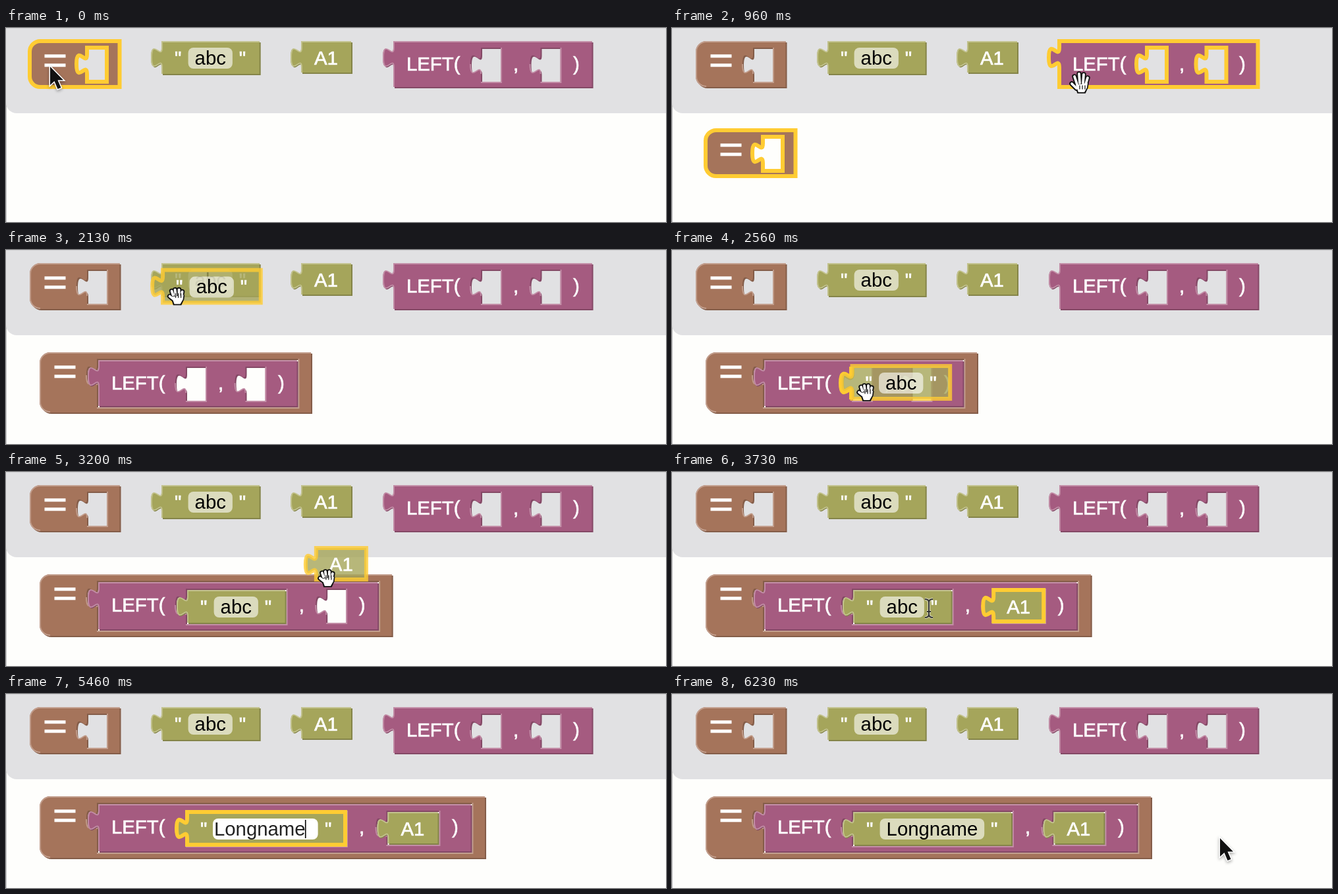
Recreate the animation shown at these times as an HTML page with a canvas. Size 1002 by 296 pixels, loop 7500 ms.

```html
<!DOCTYPE html>
<html lang="en">
<head>
<meta charset="utf-8">
<title>Formula blocks</title>
<style>
html, body { margin: 0; width: 100%; height: 100%; overflow: hidden; background: #fefefc; }
canvas { display: block; }
</style>
</head>
<body>
<canvas id="stage" width="1002" height="296"></canvas>
<script>
const ctx = document.getElementById('stage').getContext('2d');
const LOOP = 7500;
const FONT = '29.33px "Liberation Sans", Arial, Helvetica, sans-serif';
const YELLOW = '#ffcc33';
const BROWN = { fill: '#a5745b', light: '#c39f8e', dark: '#845d49' };
const OLIVE = { fill: '#a5a55b', light: '#c3c38e', dark: '#848449' };
const PLUM = { fill: '#a55b80', light: '#c38ea7', dark: '#844966' };

ctx.font = FONT;
const textWidth = s => ctx.measureText(s).width;

// Block models: size, holes and labels

function textBlock(value, typed) {
  const field = textWidth(value) + 20;
  return { color: OLIVE, w: field + 81.4, h: 50, holes: [], field, value, typed };
}

function cellBlock() {
  return { color: OLIVE, w: 76, h: 48, holes: [], labels: [['A1', 20, 35.5]] };
}

function makeHole(x, child) {
  return { x, y: 10, w: child ? child.w + 4 : 30, h: child ? child.h + 4 : 52, child };
}

function leftBlock(a, b) {
  const first = makeHole(133, a);
  const second = makeHole(133 + first.w + 60.5, b);
  const end = second.x + second.w;
  return {
    color: PLUM, w: end + 48, h: Math.max(first.h, second.h) + 18, holes: [first, second],
    labels: [['LEFT(', 20, 45], [',', 133 + first.w + 19, 45], [')', end + 19.5, 45]]
  };
}

function equalsBlock(child) {
  const slot = makeHole(87, child);
  return { color: BROWN, w: 87 + slot.w + 19.5, h: slot.h + 18, holes: [slot], round: true };
}

// Drawing

function tab(x, y) {
  ctx.lineTo(x, y + 10);
  ctx.bezierCurveTo(x, y + 30, x - 16, y - 6, x - 16, y + 25);
  ctx.bezierCurveTo(x - 16, y + 56, x, y + 20, x, y + 40);
}

function piece(x, y, w, h) {
  ctx.moveTo(x, y);
  tab(x, y);
  ctx.lineTo(x, y + h);
  ctx.lineTo(x + w, y + h);
  ctx.lineTo(x + w, y);
  ctx.closePath();
}

function outline(b) {
  ctx.beginPath();
  if (b.round) ctx.roundRect(0, 0, b.w, b.h, [16, 0, 0, 16]);
  else piece(0, 0, b.w, b.h);
  for (const s of b.holes) piece(s.x, s.y, s.w, s.h);
}

function bevel(b) {
  ctx.strokeStyle = b.color.light;
  ctx.lineWidth = 1.8;
  ctx.beginPath();
  ctx.moveTo(b.w, 1);
  if (b.round) {
    ctx.lineTo(16, 1);
    ctx.arcTo(1, 1, 1, 16, 15);
    ctx.lineTo(1, b.h - 16);
    ctx.arcTo(1, b.h - 1, 6, b.h - 1, 15);
  } else {
    ctx.lineTo(1, 1);
    tab(1, 0);
    ctx.lineTo(1, b.h);
  }
  for (const s of b.holes) {
    const r = s.x + s.w + 1, d = s.y + s.h + 1;
    ctx.moveTo(r, s.y);
    ctx.lineTo(r, d);
    ctx.lineTo(s.x, d);
    ctx.moveTo(s.x - 16, s.y + 25);
    ctx.bezierCurveTo(s.x - 16, s.y + 56, s.x, s.y + 20, s.x, s.y + 40);
  }
  ctx.stroke();
}

function label(s, x, y) {
  ctx.fillStyle = ctx.strokeStyle = '#fff';
  ctx.lineWidth = 0.7;
  ctx.fillText(s, x, y);
  ctx.strokeText(s, x, y);
}

function box(x, y, w, h, r, color) {
  ctx.fillStyle = color;
  ctx.beginPath();
  ctx.roundRect(x, y, w, h, r);
  ctx.fill();
}

function drawField(b) {
  label('"', 20, 35.5);
  label('"', 50.4 + b.field, 35.5);
  if (!b.typed) {
    box(40.6, 10, b.field, 32, 8, 'rgba(255,255,255,.6)');
    ctx.fillStyle = '#000';
    ctx.fillText(b.value, 50.6, 35.5);
    return;
  }
  const { text, caret, all } = b.typed;
  const w = textWidth(text);
  box(39, 10, b.field + 1, 32, 8, '#fff');
  if (all) box(41, 11, w, 30, 0, '#b4d5fe');
  ctx.fillStyle = '#222';
  ctx.fillText(text, 41, 36);
  if (caret && !all) {
    ctx.fillStyle = '#000';
    ctx.fillRect(41 + w - 0.7, 12, 1.6, 28);
  }
}

function drawBlock(b, x, y, drag) {
  ctx.save();
  ctx.translate(x, y);
  if (!drag) {
    ctx.save();
    ctx.translate(2, 2);
    outline(b);
    ctx.fillStyle = b.color.dark;
    ctx.fill('evenodd');
    ctx.restore();
  }
  ctx.globalAlpha = drag ? 0.8 : 1;
  outline(b);
  ctx.fillStyle = b.color.fill;
  ctx.fill('evenodd');
  if (b.selected) {
    ctx.strokeStyle = YELLOW;
    ctx.lineWidth = 6;
    ctx.stroke();
  } else bevel(b);
  ctx.globalAlpha = 1;
  if (b.round) {
    ctx.fillStyle = '#fff';
    ctx.fillRect(22.5, 20.3, 32, 5);
    ctx.fillRect(22.5, 34.3, 32, 5);
  }
  if (b.value) drawField(b);
  for (const l of b.labels || []) label(...l);
  for (const s of b.holes) if (s.child) drawBlock(s.child, s.x + 2, s.y + 2);
  ctx.restore();
}

function socketGlow(x, y) {
  ctx.beginPath();
  ctx.moveTo(x, y);
  tab(x, y);
  ctx.lineTo(x, y + 50);
  ctx.strokeStyle = YELLOW;
  ctx.lineWidth = 8;
  ctx.stroke();
}

// Pointers

function arrow() {
  ctx.beginPath();
  [[0, 0], [0, 28], [6.5, 22], [11.5, 34], [16.5, 32], [11.5, 20.5], [20, 20.5]]
    .forEach(p => ctx.lineTo(...p));
  ctx.closePath();
  ctx.shadowColor = 'rgba(0,0,0,.35)';
  ctx.shadowBlur = 4;
  ctx.shadowOffsetY = 2;
  ctx.strokeStyle = '#fff';
  ctx.lineWidth = 3;
  ctx.stroke();
  ctx.shadowColor = 'transparent';
  ctx.fillStyle = '#111';
  ctx.fill();
}

function hand(open) {
  const fingers = open
    ? [[-5, 2, -9, -10], [-1, 0, -2, -14], [4, 0, 5, -13], [8, 2, 11, -8], [-6, 8, -13, 1]]
    : [[-5, 0, -7, -6], [-1, 0, -2, -8], [4, 0, 4, -8], [8, 0, 9, -5], [-5, 6, -10, 2]];
  ctx.lineCap = ctx.lineJoin = 'round';
  const palm = grow => {
    ctx.beginPath();
    ctx.moveTo(-7 - grow, 3);
    ctx.lineTo(11 + grow, 0);
    ctx.lineTo(10 + grow, 7);
    ctx.lineTo(6 + grow, 14 + grow);
    ctx.lineTo(-3 - grow, 14 + grow);
    ctx.closePath();
    ctx.fill();
  };
  const strokes = (color, width) => {
    ctx.strokeStyle = color;
    ctx.lineWidth = width;
    for (const [a, b, c, d] of fingers) {
      ctx.beginPath();
      ctx.moveTo(a, b);
      ctx.lineTo(c, d);
      ctx.stroke();
    }
  };
  ctx.fillStyle = '#111';
  palm(1.7);
  strokes('#111', 7.5);
  ctx.fillStyle = '#fff';
  strokes('#fff', 3.8);
  palm(0);
  ctx.strokeStyle = '#222';
  ctx.lineWidth = 1.3;
  for (const x of [-1, 3, 7]) {
    ctx.beginPath();
    ctx.moveTo(x, open ? 4 : -2);
    ctx.lineTo(x, open ? 9 : 4);
    ctx.stroke();
  }
}

function ibeam() {
  ctx.beginPath();
  for (const s of [-1, 1]) {
    ctx.moveTo(-6, 14 * s);
    ctx.quadraticCurveTo(0, 14 * s, 0, 9 * s);
    ctx.quadraticCurveTo(0, 14 * s, 6, 14 * s);
  }
  ctx.moveTo(0, -10);
  ctx.lineTo(0, 10);
  ctx.moveTo(-3, 5);
  ctx.lineTo(3, 5);
  ctx.strokeStyle = 'rgba(255,255,255,.6)';
  ctx.lineWidth = 4;
  ctx.stroke();
  ctx.strokeStyle = '#333';
  ctx.lineWidth = 2;
  ctx.stroke();
}

const pointers = { arrow, ibeam, open: () => hand(true), closed: () => hand(false) };

// Motion: time, x, y of the pointer
const PATH = [
  [330, 67, 59], [620, 82, 195], [680, 82, 195], [960, 620, 84], [1030, 639, 60],
  [1130, 639, 60], [1530, 221, 212], [1640, 193, 210], [1700, 193, 210], [1990, 256, 58],
  [2050, 256, 58], [2560, 294, 215], [2660, 295, 217], [2900, 464, 64], [2960, 464, 64],
  [3400, 504, 232], [3440, 504, 232], [3730, 390, 208], [3860, 350, 206], [5630, 350, 206],
  [5860, 790, 232], [5960, 832, 220]
];

function pointerAt(t) {
  const i = PATH.findIndex(p => p[0] > t);
  if (i === 0) return PATH[0].slice(1);
  if (i < 0) return PATH[PATH.length - 1].slice(1);
  const [t0, x0, y0] = PATH[i - 1], [t1, x1, y1] = PATH[i];
  const u = (t - t0) / (t1 - t0), k = u * u * (3 - 2 * u);
  return [x0 + (x1 - x0) * k, y0 + (y1 - y0) * k];
}

const KEYS = [4400, 4460, 4510, 4560, 4800, 4860, 4910, 4960];
function typedAt(t) {
  const n = KEYS.filter(k => k <= t).length;
  return n ? 'Longname'.slice(0, n) : 'abc';
}

const during = (t, a, b) => t >= a && t < b;
const inside = (x, y, bx, by, b) => x >= bx && x <= bx + b.w && y >= by && y <= by + b.h;

function render(t) {
  const [px, py] = pointerAt(t);
  const dragging = during(t, 330, 620) || during(t, 1130, 1640) ||
    during(t, 2050, 2630) || during(t, 2960, 3430);

  ctx.font = FONT;
  ctx.fillStyle = '#fefefc';
  ctx.fillRect(0, 0, 1002, 296);
  ctx.fillStyle = '#c6c6c6';
  ctx.fillRect(0, 0, 1, 296);
  box(0, 0, 1002, 130, [0, 0, 0, 16], '#e1e1e3');
  ctx.fillStyle = '#d4d4d6';
  ctx.fillRect(0, 0, 1002, 1);

  // Palette
  let over = false;
  const palette = [[equalsBlock(), 36], [textBlock('abc'), 236], [cellBlock(), 448], [leftBlock(), 588]];
  for (const [b, x] of palette) {
    b.selected = !dragging && inside(px, py, x, 20, b);
    over = over || b.selected;
    drawBlock(b, x, 20);
  }

  // Workspace
  const editing = during(t, 3960, 6200);
  const text = textBlock(typedAt(t - 36), editing && {
    text: typedAt(t), all: t < 4400, caret: !during(t, 5200, 5460)
  });
  text.selected = during(t, 2050, 2960) || during(t, 3900, 6200);
  const cell = cellBlock();
  cell.selected = during(t, 2960, 3900);
  const left = leftBlock(t >= 2630 && text, t >= 3430 && cell);
  left.selected = during(t, 1130, 2050);
  const root = equalsBlock(t >= 1640 && left);
  root.selected = during(t, 330, 1130);

  if (t >= 620) {
    drawBlock(root, 51, 156);
    over = over || inside(px, py, 51, 156, root);
  }
  if (during(t, 1490, 1640)) socketGlow(138, 166);
  if (during(t, 2500, 2630)) socketGlow(273, 178);
  if (during(t, 3330, 3430)) socketGlow(486.5, 178);

  if (during(t, 330, 620)) drawBlock(root, px - 31, py - 39, true);
  if (during(t, 1130, 1640)) drawBlock(left, px - 51, py - 40, true);
  if (during(t, 2050, 2630)) drawBlock(text, px - 20.5, py - 38, true);
  if (during(t, 2960, 3430)) drawBlock(cell, px - 16, py - 44, true);

  // Pointer
  if (during(t, 4400, 5630)) return;
  let kind = over ? 'open' : 'arrow';
  if (t < 330) kind = 'arrow';
  else if (dragging) kind = 'closed';
  else if (during(t, 3680, 4400) || during(t, 5630, 5720)) kind = 'ibeam';
  ctx.save();
  ctx.translate(px, py);
  pointers[kind]();
  ctx.restore();
}

function tick() {
  render(performance.now() % LOOP);
  requestAnimationFrame(tick);
}
tick();
</script>
</body>
</html>
```
